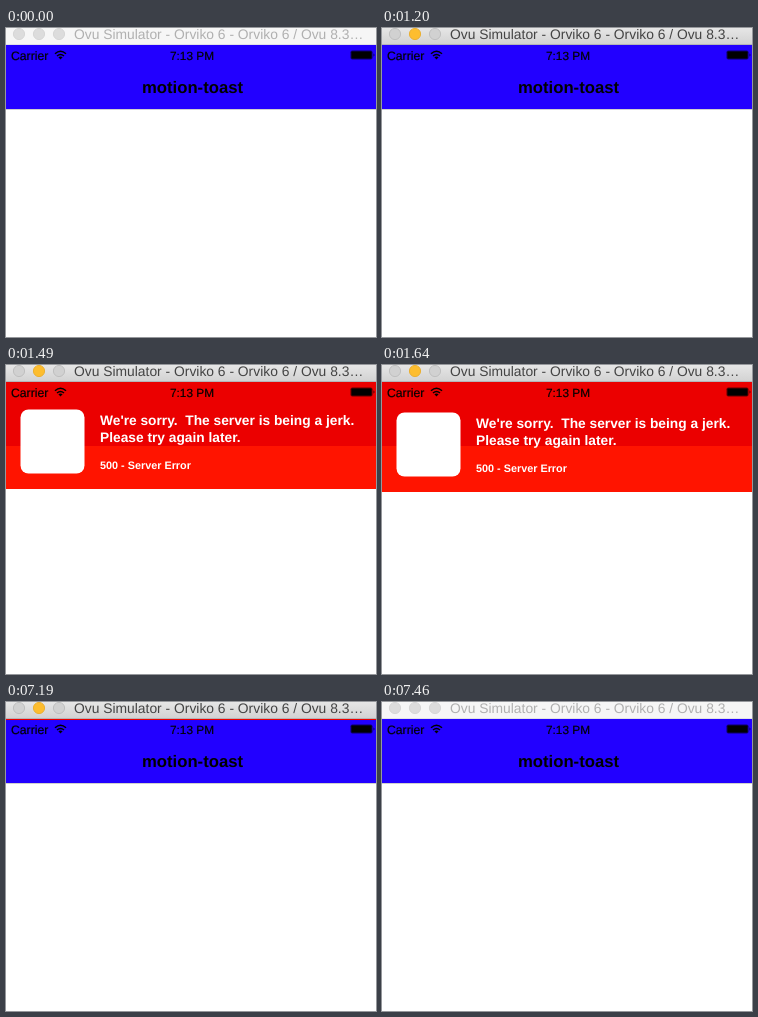
Recreate the animation shown at these times as an HTML page. Size 370 px wide and 309 px high, loop 7560 ms.

```html
<!DOCTYPE html>
<html lang="en">
<head>
<meta charset="utf-8">
<title>Toast demo</title>
<style>
  html, body { margin: 0; width: 100%; height: 100%; overflow: hidden; background: #fff; }
  svg { display: block; width: 370px; height: 309px; }
  text { font-family: "Liberation Sans", Arial, sans-serif; white-space: pre; text-rendering: geometricPrecision; }
  .bold { font-weight: bold; }
  #toast text { fill: #fff; }
  .status text { stroke: #000; stroke-width: .2; }
  .light { fill: #dcdcdc; stroke: #d6d6d6; }
  #caption { fill: #b0b0b0; }
  .active .light { fill: #d1d1d1; stroke: #bfbfbf; }
  .active .mid { fill: #fdbd2e; stroke: #eab033; }
  .active #caption { fill: #444; }
  #bar { fill: #f6f6f6; }
  .active #bar { fill: url(#chrome); }
  #edge { fill: #e0e0e8; }
  .active #edge { fill: #b4b4b8; }
</style>
</head>
<body>
<svg viewBox="0 0 370 309">
  <defs>
    <linearGradient id="chrome" x1="0" y1="0" x2="0" y2="1">
      <stop offset="0" stop-color="#e6e6e6"/>
      <stop offset="1" stop-color="#d2d2d2"/>
    </linearGradient>
  </defs>

  <rect width="370" height="309" fill="#fff"/>
  <rect y="17" width="370" height="64" fill="#2200ff"/>
  <rect y="81" width="370" height="1" fill="#d0d0d0"/>
  <text class="bold" x="186.5" y="65" font-size="16.7" text-anchor="middle">motion-toast</text>

  <rect id="low" y="81" width="370" fill="#ff1400"/>
  <rect id="high" y="17" width="370" fill="#eb0000"/>
  <g id="toast">
    <rect x="14.5" y="47.5" width="64" height="64" rx="8" fill="#fff"/>
    <text class="bold" x="94" y="63" font-size="13.75">We're sorry.  The server is being a jerk.</text>
    <text class="bold" x="94" y="80" font-size="13.75">Please try again later.</text>
    <text class="bold" x="94" y="107" font-size="10.84">500 - Server Error</text>
  </g>

  <g class="status">
    <text x="5" y="31.5" font-size="12.2">Carrier</text>
    <text x="186" y="31.5" font-size="11.8" text-anchor="middle">7:13 PM</text>
    <g fill="none" stroke="#000" stroke-width="1.5">
      <path d="M49 25.7Q54.5 20.9 60 25.7"/>
      <path d="M51 28Q54.5 24.9 58 28"/>
    </g>
    <path d="M52.4 29.3Q54.5 27.5 56.6 29.3L54.5 31.6Z"/>
    <rect x="344.5" y="22.5" width="22" height="9" rx="1.8" fill-opacity=".6"/>
    <rect x="345.5" y="23.5" width="20" height="7" rx=".8"/>
    <path d="M367.6 25.3Q369.4 27 367.6 28.7Z"/>
  </g>

  <g id="frame">
    <rect id="bar" width="370" height="16.5"/>
    <rect id="edge" y="16" width="370" height="1"/>
    <circle class="light" cx="13" cy="6" r="5.6"/>
    <circle class="light mid" cx="33" cy="6" r="5.6"/>
    <circle class="light" cx="53" cy="6" r="5.6"/>
    <text id="caption" x="68" y="11" font-size="13.85">Ovu Simulator - Orviko 6 - Orviko 6 / Ovu 8.3…</text>
  </g>
</svg>
<script>
  const LOOP = 7560, TOP = 17, NAV = 81, REST = 127;
  // [start ms, bottom edge of the toast]
  const steps = [[0, TOP], [1350, 65], [1490, 124], [1640, REST], [7040, 111], [7190, 18], [7340, TOP]];
  const el = id => document.getElementById(id);
  const high = el("high"), low = el("low"), toast = el("toast"), frame = el("frame");

  function draw(t) {
    const bottom = steps.filter(s => s[0] <= t).pop()[1];
    high.setAttribute("height", Math.min(bottom, NAV) - TOP);
    low.setAttribute("height", Math.max(0, bottom - NAV));
    toast.setAttribute("transform", `translate(0 ${bottom - REST})`);
    toast.setAttribute("visibility", bottom > TOP ? "visible" : "hidden");
    frame.setAttribute("class", t >= 1200 && t < 7460 ? "active" : "");
  }

  const start = performance.now();
  function tick() {
    draw((performance.now() - start) % LOOP);
    requestAnimationFrame(tick);
  }
  tick();
</script>
</body>
</html>
```
